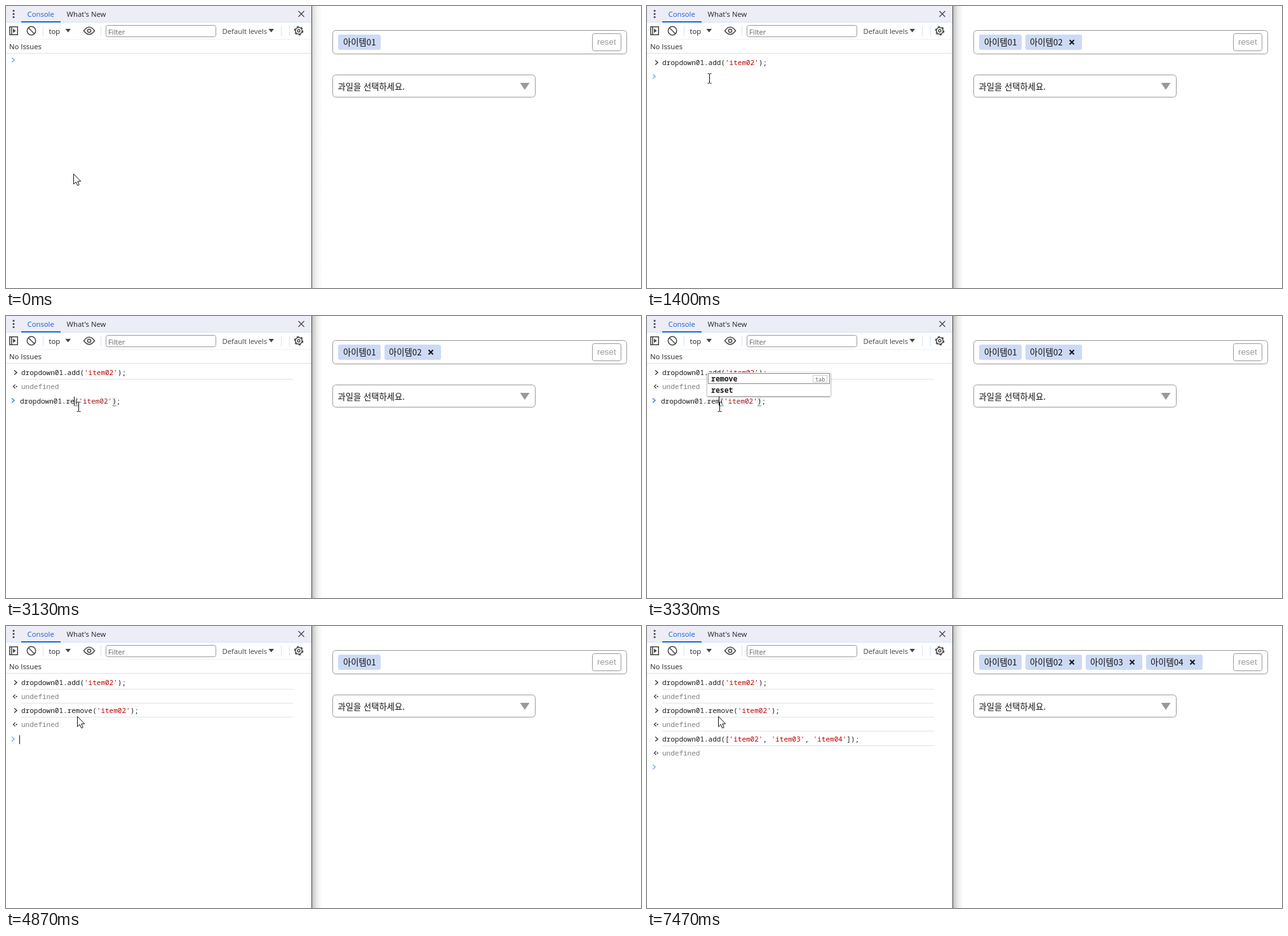
Write an HTML page that moves like this. It is 1000 px wide and 444 px high and loops after 8 s.

```html
<!DOCTYPE html>
<html lang="ko">
<head>
<meta charset="utf-8">
<style>
  html, body { margin: 0; width: 100%; height: 100%; overflow: hidden; background: #fff; }
  svg { display: block; width: 1000px; height: 444px; }
  text { white-space: pre; }
  .ui { font: 11.3px "Open Sans", "Noto Sans", sans-serif; fill: #222; }
  .ko { font: 13.333px "Noto Sans CJK KR", "Noto Sans CJK", "Noto Sans KR", sans-serif; fill: #111; }
  .code { font: 11px "Noto Sans Mono", monospace; fill: #1c1c1c; }
  .icon { fill: none; stroke: #444; stroke-width: 1.5; }
  .box { fill: #fff; stroke: #999; }
  .rule { fill: #d3e3fd; }
</style>
</head>
<body>
<svg viewBox="0 0 1000 444">
  <defs>
    <linearGradient id="shade">
      <stop offset="0" stop-color="#000" stop-opacity=".24"/>
      <stop offset=".5" stop-color="#000" stop-opacity=".07"/>
      <stop offset="1" stop-color="#000" stop-opacity="0"/>
    </linearGradient>
    <path id="arrow" d="M.5 .5V16.5L4.2 13 6.7 18.7 9.2 17.6 6.8 12H11.7Z" fill="#fff" stroke="#111"/>
    <path id="beam" d="M-3 -7.5H-1L0 -7 1 -7.5H3M0 -7V7M-3 7.5H-1L0 7 1 7.5H3" fill="none" stroke="#111"/>
  </defs>

  <!-- console tabs -->
  <rect width="481" height="25" fill="#ecedf7"/>
  <rect class="rule" y="25" width="481" height="1"/>
  <rect x="24" y="24" width="62" height="2" fill="#1a68d8"/>
  <g fill="#444"><circle cx="12" cy="7.5" r="1.5"/><circle cx="12" cy="12.5" r="1.5"/><circle cx="12" cy="17.5" r="1.5"/></g>
  <text class="ui" x="33.5" y="17" style="fill:#1a5fd0">Console</text>
  <text class="ui" x="95.5" y="17">What's New</text>
  <path class="icon" d="M460.5 8 469.5 17M469.5 8 460.5 17" style="stroke-width:1.3"/>

  <!-- console toolbar -->
  <g class="icon">
    <path d="M5.8 32.8H18.2V45.2H5.8ZM8.8 33V45"/>
    <circle cx="40" cy="39" r="6.7"/><path d="M35.3 34.3 44.7 43.7"/>
    <path d="M122.5 39Q131 27.500 139.500 39Q131 50.500 122.500 39Z"/><circle cx="131" cy="39" r="2.6"/>
    <circle cx="461" cy="39" r="5.3"/><circle cx="461" cy="39" r="6.6" stroke-dasharray="3.5 3.411"/>
    <circle cx="461" cy="39" r="1.9"/>
  </g>
  <path d="M11 35.500 15.500 39 11 42.500ZM93.500 36H102L97.800 41.500ZM413.500 36H422L417.800 41.500Z" fill="#444"/>
  <g class="rule">
    <rect x="58" y="31" width="1" height="16"/><rect x="149" y="31" width="1" height="16"/>
    <rect x="433" y="31" width="1" height="16"/><rect x="446" y="31" width="1" height="16"/>
    <rect y="52" width="481" height="1" opacity=".5"/><rect y="74" width="481" height="1"/>
  </g>
  <rect class="box" x="157.500" y="30.500" width="173" height="18" rx="3"/>
  <text class="ui" x="67.500" y="44">top</text>
  <text class="ui" x="161" y="45" style="fill:#666">Filter</text>
  <text class="ui" x="340.500" y="44" style="fill:#444">Default levels</text>
  <text class="ui" x="5" y="68">No Issues</text>
  <rect x="481" width="1" height="444" fill="#444"/>

  <!-- page -->
  <rect class="box" x="514.500" y="38.500" width="463" height="37" rx="5"/>
  <rect class="box" x="923.500" y="43.500" width="45" height="27" rx="3"/>
  <text x="931" y="61" font-family="Liberation Sans, Arial, sans-serif" font-size="13.333" fill="#999">reset</text>
  <rect class="box" x="514.500" y="108.500" width="319" height="35" rx="5"/>
  <text class="ko" x="522.500" y="131.500">과일을 선택하세요.</text>
  <path d="M809.500 121H824.500L817 132Z" fill="#999"/>

  <g id="live"></g>
</svg>
<script>
const LOOP = 8000, CHAR = 6.6;
const ROWS = [89, 111, 133, 155, 178, 200];
const PROMPTS = [85, 111, 133, 155, 178, 200, 222];
const MENU = ['remove', 'reset', 'render'];

const call = method => `dropdown01.${method}('item02');`;
const list = "dropdown01.add(['item02', 'item03', 'item04']);";
const LOG = [call('add'), '', call('remove'), '', list, ''];

// Each step changes part of the state; caret is a column, -1 hides it.
const edit = (method, extra) => ({ text: call(method), caret: 11 + method.length, match: true, ...extra });
const line = text => ({ text, caret: text.length, match: false });
const enter = (log, chips) => ({ log, chips, text: '', caret: -1, match: false, menu: 0 });
const steps = [
  [0, { log: 0, chips: 1, text: '', caret: -1, match: false, menu: 0, shade: 0.6, mouse: ['arrow', 106, 264] }],
  [70, { mouse: ['arrow', 104, 230] }],
  [133, { mouse: ['arrow', 101, 175] }],
  [200, { mouse: ['arrow', 99, 132] }],
  [267, { mouse: ['beam', 98, 116] }],
  [333, { mouse: ['beam', 98, 114], shade: 1 }],
  [400, { caret: 0 }],
  [600, line(call('add'))],
  [1200, { caret: -1 }],
  [1400, enter(1, 2)],
  [1470, { log: 2, mouse: ['beam', 99, 121] }],
  [1800, line(call('add'))],
  [2400, { ...edit('add'), mouse: ['beam', 106, 132] }],
  [2470, { mouse: ['beam', 113, 141] }],
  [2530, edit('ad')],
  [2670, edit('a', { mouse: ['beam', 114, 143] })],
  [2800, edit('')],
  [2870, edit('r')],
  [3070, { menu: 3 }],
  [3130, edit('re', { menu: 0 })],
  [3200, { menu: 2 }],
  [3330, edit('rem')],
  [3530, edit('remo', { menu: 1 })],
  [3600, edit('remov')],
  [3670, edit('remove')],
  [4130, enter(3, 1)],
  [4200, { log: 4 }],
  [4270, { mouse: ['arrow', 112, 142] }],
  [4870, { caret: 0 }],
  [5070, line(call('remove'))],
  [5530, line(call('add'))],
  [5670, line(list)],
  [6270, { caret: -1 }],
  [6730, enter(5, 4)],
  [6800, { log: 6 }],
  [6870, { caret: 0 }],
  [7470, { caret: -1 }]
];

const rect = (x, y, w, h, fill, more = '') =>
  `<rect x="${x}" y="${y}" width="${w}" height="${h}" fill="${fill}" ${more}/>`;
const stroke = (d, color, width = 1.4) =>
  `<path d="${d}" fill="none" stroke="${color}" stroke-width="${width}"/>`;
const chevron = (x, y, color) => stroke(`M${x - 2} ${y - 3.5}l4 3.5-4 3.5`, color);
const code = (x, y, text, red) =>
  `<text class="code" x="${x}" y="${y}">${text.replace(/'\w+'/g, s => `<tspan fill="${red}">${s}</tspan>`)}</text>`;

function logRow(i, count) {
  const y = ROWS[i];
  const body = LOG[i]
    ? chevron(15, y, '#333') + code(24, y + 4, LOG[i], '#c00000')
    : stroke(`M14.500 ${y - 3}l-3 3 3 3`, '#444') + rect(15.5, y - 1, 2, 2, '#444') +
      `<text class="code" x="24" y="${y + 4}" style="fill:#808080">undefined</text>`;
  return body + (i < count - 1 ? rect(24, y + 10, 428, 1, '#dce2ec') : '');
}

function prompt({ log, text, caret, match }) {
  const y = PROMPTS[log];
  let out = chevron(11, y, text ? '#2b7de9' : '#76a5ef');
  if (match) {
    for (const c of '()') {
      const x = 22 + text.indexOf(c) * CHAR;
      out += rect(x, y - 5, CHAR, 13, '#edf3f3') + rect(x, y + 8, CHAR, 1, '#6d8f8c');
    }
  }
  out += code(22, y + 5, text, '#a31515');
  if (caret >= 0) out += rect(Math.floor(21.4 + caret * CHAR), y - 6, 1, 14, '#111');
  return out;
}

function menu(count) {
  if (!count) return '';
  const top = 126 - 18 * count;
  let out = rect(95, top - 1, 194, 18 * count + 1, '#fff',
    'style="filter:drop-shadow(0 1px 1.5px #0008)"');
  out += rect(96.5, top + 0.5, 191, 16, '#fff', 'stroke="#111" stroke-dasharray="1 1"');
  out += rect(261.5, top + 3.5, 22, 11, '#fff', 'stroke="#ccc"') +
    `<text class="code" x="265" y="${top + 13}" style="font-size:8.5px;fill:#666">tab</text>`;
  MENU.slice(0, count).forEach((word, i) => {
    out += `<text class="code" x="101" y="${top + 13 + 18 * i}" style="font-size:11.5px;font-weight:700">${word}</text>`;
  });
  return out;
}

function chip(i) {
  const x = i ? 501 + 95 * i : 523;
  return rect(x, 45, i ? 89 : 67, 24, '#cddaf5', 'rx="3"') +
    `<text class="ko" x="${x + (i ? 7 : 8)}" y="62">아이템0${i + 1}</text>` +
    (i ? stroke(`M${x + 69.5} 53.500l7 7m0-7l-7 7`, '#111', 1.9) : '');
}

const range = (n, f) => Array.from({ length: n }, (_, i) => f(i)).join('');
const live = document.getElementById('live');
let shown = -1;

function draw(now) {
  const t = now % LOOP;
  const passed = steps.filter(([start]) => start <= t);
  if (passed.length !== shown) {
    shown = passed.length;
    const s = Object.assign({}, ...passed.map(([, change]) => change));
    const [kind, x, y] = s.mouse;
    live.innerHTML =
      rect(482, 0, 16, 444, 'url(#shade)', `opacity="${s.shade}"`) +
      range(s.log, i => logRow(i, s.log)) + prompt(s) + menu(s.menu) + range(s.chips, chip) +
      `<use href="#${kind}" x="${x + (kind === 'beam' ? 0.5 : 0)}" y="${y}"/>`;
  }
  requestAnimationFrame(draw);
}
draw(performance.now());
</script>
</body>
</html>
```
